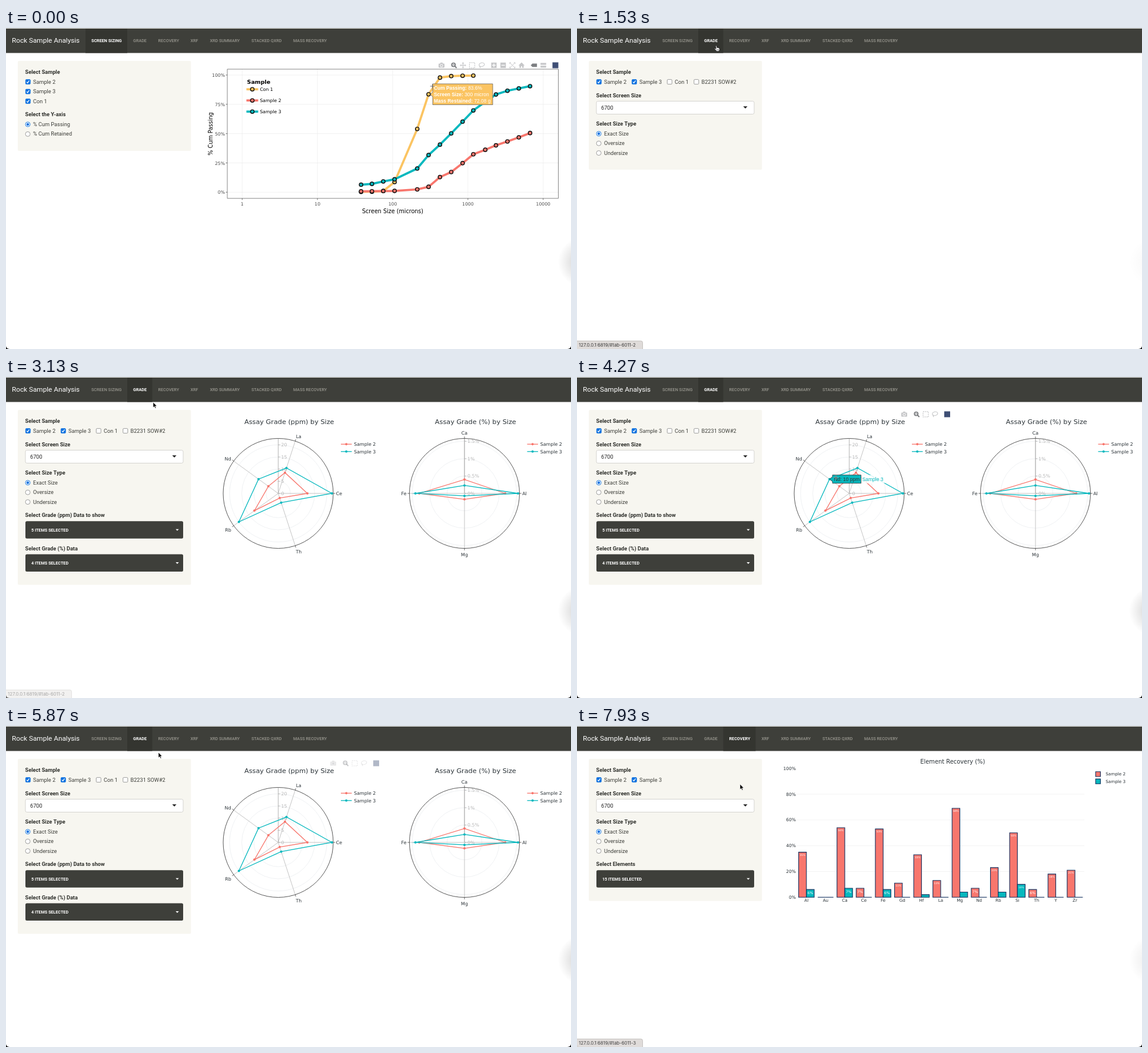
These frames come from a looping animation (960x546 px, 8000 ms). An HTML page with a canvas:

```html
<!DOCTYPE html>
<html lang="en">
<head>
<meta charset="utf-8">
<title>Rock Sample Analysis</title>
<style>
html, body { margin: 0; width: 100%; height: 100%; overflow: hidden; background: #fff; }
canvas { display: block; width: 960px; height: 546px; }
</style>
</head>
<body>
<canvas id="stage"></canvas>
<script>
const W = 960, H = 546, LOOP = 8000;
const canvas = document.getElementById('stage');
const dpr = window.devicePixelRatio || 1;
canvas.width = W * dpr;
canvas.height = H * dpr;
const c = canvas.getContext('2d');

const UI = 'Roboto, sans-serif', PLOT = '"DejaVu Sans", sans-serif', HOVER = '"Liberation Sans", Arial, sans-serif';
const DARK = '#3e3f3a', RED = '#f8766d', TEAL = '#06b8be', GOLD = '#fbc462', NAVY = '#12305f';

// drawing helpers
function text(s, x, y, size, color, font = UI, align = 'left', weight = 400) {
  c.font = `${weight} ${size}px ${font}`;
  c.textAlign = align;
  c.fillStyle = color;
  c.fillText(s, x, y + size * 0.36);
}
const plotText = (s, x, y, size = 7.7, align = 'center', color = '#2b3338', weight = 400) =>
  text(s, x, y, size, color, PLOT, align, weight);

function box(x, y, w, h, fill, stroke, radius = 0, lw = 0.7) {
  c.beginPath();
  c.roundRect(x, y, w, h, radius);
  paint(fill, stroke, lw);
}
function paint(fill, stroke, lw = 1) {
  if (fill) { c.fillStyle = fill; c.fill(); }
  if (stroke) { c.strokeStyle = stroke; c.lineWidth = lw; c.stroke(); }
}
function poly(pts, fill, stroke, lw, close = true) {
  c.beginPath();
  pts.forEach(([x, y]) => c.lineTo(x, y));
  if (close) c.closePath();
  paint(fill, stroke, lw);
}
const line = (x1, y1, x2, y2, color, lw = 0.7) => poly([[x1, y1], [x2, y2]], null, color, lw, false);
function dot(x, y, r, fill, stroke, lw) {
  c.beginPath();
  c.arc(x, y, r, 0, 7);
  paint(fill, stroke, lw);
}
function withAlpha(a, draw) {
  if (a <= 0) return;
  c.save();
  c.globalAlpha = Math.min(a, 1);
  draw();
  c.restore();
}
const ramp = (t, a, b) => Math.max(0, Math.min(1, (t - a) / (b - a)));
const pulse = (t, in0, in1, out0, out1) => ramp(t, in0, in1) * (1 - ramp(t, out0, out1));

// pointer
const PATH = [
  [0, 724.5, 99], [70, 724.5, 99], [470, 610, 150], [670, 610, 150], [1270, 236.5, 30],
  [1800, 236.5, 30], [2600, 249, 41], [2670, 249, 41], [2800, 250, 43], [3130, 250, 43],
  [3800, 430, 172], [4070, 430, 172], [4270, 440, 171], [4470, 482, 156], [4930, 482, 156],
  [5130, 476, 166], [5330, 476, 166], [5800, 259, 45], [5900, 259, 45], [6130, 271, 18],
  [7070, 271, 18], [7730, 277, 99], [8000, 277, 99]
];
function pointer(t) {
  const i = PATH.findIndex(p => p[0] > t);
  const [t0, x0, y0] = PATH[i - 1], [t1, x1, y1] = PATH[i];
  const k = (t - t0) / (t1 - t0), e = k * k * (3 - 2 * k);
  return [x0 + (x1 - x0) * e, y0 + (y1 - y0) * e];
}
function drawPointer(x, y, page) {
  const onPlot = page === 0 ? x > 376 && y > 70 : page === 1 && Math.hypot(x - 462.5, y - 198) < 93;
  c.save();
  c.translate(x, y);
  if (y < 42) {
    c.lineJoin = 'round';
    poly([[-0.9, 0.6], [0.1, 0], [1, 0.7], [1.4, 3.4], [2.6, 3.1], [3.2, 3.8], [4.4, 3.6], [4.9, 4.5],
      [5.9, 4.7], [5.7, 7.6], [4.6, 9.8], [0.6, 9.8], [-1, 7.4], [-2.9, 5.2], [-2.1, 4.4], [-0.3, 5.4]], '#fff', '#111', 0.8);
    for (const fx of [1.2, 2.6, 4]) line(fx, 6, fx, 8.3, '#111', 0.5);
  } else if (onPlot) {
    for (const [color, lw] of [['#fff8', 1.6], ['#333', 0.7]]) {
      line(-3.8, 0, 3.8, 0, color, lw);
      line(0, -3.8, 0, 3.8, color, lw);
    }
  } else {
    poly([[0, 0], [0, 9], [2.1, 7.1], [3.6, 10.3], [5, 9.7], [3.6, 6.6], [6.3, 6.4]], '#000', '#fff', 0.6);
  }
  c.restore();
}

// page frame
const TABS = [['SCREEN SIZING', 145], ['GRADE', 216], ['RECOVERY', 258.5], ['XRF', 313.5],
  ['XRD SUMMARY', 346.5], ['STACKED QXRD', 417], ['MASS RECOVERY', 488]];
function navbar(page, x, y) {
  box(0, 0, W, 1, '#e6e6e4');
  box(0, 1, W, 41.4, DARK);
  text('Rock Sample Analysis', 10, 20.5, 11.75, '#fff');
  TABS.forEach(([name, tx], i) => {
    const left = tx - 10, right = i < 6 ? TABS[i + 1][1] - 10 : 555;
    const hover = y < 42 && x >= left && x < right;
    if (i === page) box(left, 1, right - left, 41.4, '#343530');
    text(name, tx, 21.3, 7.2, i === page || hover ? '#fff' : '#98978f', UI, 'left', i === page ? 700 : 500);
  });
}
const label = (s, y) => text(s, 32.6, y, 9.17, '#2f302c', UI, 'left', 700);
const option = (s, x, y) => text(s, x + 13, y, 9.17, '#3e3f3a');
function check(s, x, y, on) {
  box(x + 0.3, y - 3.7, 8, 8, on ? '#0b70e0' : '#fff', on ? '#0b70e0' : '#777', 1.4);
  if (on) poly([[x + 2.2, y + 0.5], [x + 3.7, y + 2.2], [x + 6.5, y - 2]], null, '#fff', 1.3, false);
  option(s, x, y);
}
function radio(s, y, on) {
  dot(37, y + 0.4, 4, '#fff', on ? '#0b70e0' : '#777', on ? 0.9 : 0.7);
  if (on) dot(37, y + 0.4, 2.2, '#0b70e0');
  option(s, 33, y);
}
const caret = (x, y, w, h, color) => poly([[x - w, y - h], [x + w, y - h], [x, y + h]], color);
function picker(title, s, y) {
  label(title, y);
  box(33, y + 10.2, 268, 29.6, DARK, null, 2.5);
  text(s, 43, y + 25, 7.2, '#fff', UI, 'left', 700);
  caret(291, y + 25.2, 2.7, 1.4, '#fff');
}
function sidebar(page, stage) {
  const height = page === 0 ? 153 : stage === 0 ? 119 : stage === 1 ? 185 : page === 1 ? 297.5 : 241.5;
  box(20, 56, 294.3, height, '#f7f6f0', null, 2);
  label('Select Sample', 75);
  if (page === 0) {
    ['Sample 2', 'Sample 3', 'Con 1'].forEach((s, i) => check(s, 33, 91.3 + i * 16.5, true));
    label('Select the Y-axis', 147);
    radio('% Cum Passing', 163.5, true);
    radio('% Cum Retained', 180, false);
    return;
  }
  check('Sample 2', 33, 91.3, true);
  check('Sample 3', 93, 91.3, true);
  if (page === 1) {
    check('Con 1', 153, 91.3, false);
    check('B2231 SOW#2', 198.5, 91.3, false);
  }
  label('Select Screen Size', 114.3);
  box(33, 124.5, 268, 22, '#fff', '#c6c5c0', 2.5);
  text('6700', 41, 135.3, 9.17, '#222');
  caret(286, 135.2, 3.6, 1.9, '#222');
  if (stage < 1) return;
  label('Select Size Type', 162.7);
  ['Exact Size', 'Oversize', 'Undersize'].forEach((s, i) => radio(s, 179.4 + i * 16.4, i === 0));
  if (stage < 2) return;
  if (page === 1) {
    picker('Select Grade (ppm) Data to show', '5 ITEMS SELECTED', 235);
    picker('Select Grade (%) Data', '4 ITEMS SELECTED', 291.3);
  } else picker('Select Elements', '15 ITEMS SELECTED', 235);
}
function statusBar(url) {
  box(-3, 532.3, 114.5, 18, '#dfdbd9', '#b9b5b3', 3, 0.8);
  text(url, 3, 539.4, 7.8, '#3a3a3a', 'Inter, sans-serif');
}
function edges(glow) {
  const g = c.createRadialGradient(980, 398, 12, 980, 398, 42);
  g.addColorStop(0, `rgba(0,0,0,${glow})`);
  g.addColorStop(0.4, `rgba(0,0,0,${glow * 0.55})`);
  g.addColorStop(1, 'rgba(0,0,0,0)');
  c.fillStyle = g;
  c.fillRect(930, 350, 30, 96);
  for (const [x, d] of [[0, 1], [W, -1]]) {
    c.beginPath();
    c.moveTo(x, H - 5);
    c.quadraticCurveTo(x + d * 0.6, H - 0.6, x + d * 6, H);
    c.lineTo(x, H);
    paint('#111');
  }
}

// chart toolbar
const ICONS = {
  camera(x, y, k) { box(x - 5, y - 3, 10, 7, k, null, 1); box(x - 2, y - 4.5, 4, 2, k); dot(x, y + 0.5, 2.2, k, '#fff', 1); },
  zoom(x, y, k) { dot(x - 0.7, y - 0.8, 3, null, k, 1.9); line(x + 1.5, y + 1.4, x + 4.6, y + 4.6, k, 2); line(x - 2.2, y - 0.8, x + 0.8, y - 0.8, k, 1); },
  pan(x, y, k) {
    line(x - 4, y, x + 4, y, k, 1.1); line(x, y - 4, x, y + 4, k, 1.1);
    for (let i = 0; i < 4; i++) {
      const dx = [0, 1, 0, -1][i], dy = [-1, 0, 1, 0][i];
      poly([[x + dx * 5.3, y + dy * 5.3], [x + dx * 3 + dy * 2, y + dy * 3 + dx * 2], [x + dx * 3 - dy * 2, y + dy * 3 - dx * 2]], k);
    }
  },
  select(x, y, k) { c.setLineDash([2, 1.2]); box(x - 4.5, y - 4.5, 9, 9, null, k, 0, 1.2); c.setLineDash([]); },
  lasso(x, y, k) {
    c.beginPath(); c.ellipse(x + 0.3, y - 1, 4.6, 3.2, -0.2, 0, 7); paint(null, k, 1.1);
    line(x - 3, y + 1, x - 2.2, y + 4.6, k, 1.3);
  },
  plus(x, y, k) { box(x - 4.6, y - 4.6, 9.2, 9.2, k); line(x - 3, y, x + 3, y, '#fff', 1.4); line(x, y - 3, x, y + 3, '#fff', 1.4); },
  minus(x, y, k) { box(x - 4.6, y - 4.6, 9.2, 9.2, k); line(x - 3, y, x + 3, y, '#fff', 1.4); },
  auto(x, y, k) {
    for (const a of [-1, 1]) for (const b of [-1, 1]) {
      line(x, y, x + a * 3.6, y + b * 3.6, k, 1);
      poly([[x + a * 2.4, y + b * 4.6], [x + a * 4.6, y + b * 4.6], [x + a * 4.6, y + b * 2.4]], null, k, 1, false);
    }
  },
  home(x, y, k) { poly([[x - 5.2, y + 0.3], [x, y - 4.8], [x + 5.2, y + 0.3]], k); box(x - 3.6, y, 2.6, 4.4, k); box(x + 1, y, 2.6, 4.4, k); box(x - 3, y - 0.5, 6, 2, k); },
  tag(x, y, k) { poly([[x - 5.4, y], [x - 2.6, y - 2.8], [x + 5.2, y - 2.8], [x + 5.2, y + 2.8], [x - 2.6, y + 2.8]], k); },
  tags(x, y, k) { box(x - 4.8, y - 4, 9.6, 3.2, k); box(x - 4.8, y + 0.8, 9.6, 3.2, k); },
  mark(x, y) { box(x - 5, y - 5, 10, 10, '#3f4f75'); }
};
function toolbar(items) {
  items.forEach(([name, x, on]) => ICONS[name](x, 63.4, on ? '#7d7f82' : '#c6c7c9'));
}
const BAR_FULL = [['camera', 740], ['zoom', 761, 1], ['pan', 776.5], ['select', 792], ['lasso', 808], ['plus', 829],
  ['minus', 844.7], ['auto', 860.4], ['home', 876], ['tag', 897, 1], ['tags', 913], ['mark', 933.5]];
const BAR_SHORT = [['camera', 556], ['zoom', 577, 1], ['select', 592.5], ['lasso', 608], ['mark', 629]];

// screen sizing chart
const SIZES = [38, 53, 75, 106, 212, 300, 425, 600, 850, 1180, 1700, 2360, 3350, 4750, 6700];
const CURVES = [
  ['Con 1', GOLD, [0.3, 0.4, 1, 8.7, 54, 83.6, 97.8, 99.1, 99.4, 99.5]],
  ['Sample 2', RED, [0.7, 0.8, 1, 1.1, 2.4, 4.6, 12.9, 17.2, 24.8, 32.4, 36.2, 40, 43.3, 46.8, 50.5]],
  ['Sample 3', TEAL, [6.4, 7.1, 9.2, 11, 20.2, 31.7, 40.6, 50.2, 60.2, 69.8, 77.2, 83.4, 86.6, 88.6, 90.5]]
];
const sizeX = v => 401.3 + 127.85 * Math.log10(v);
const passY = p => 279.3 - p * 1.993;
function sizingChart(t) {
  for (let i = 0; i < 5; i++) {
    const x = sizeX(10 ** i), y = passY(i * 25);
    line(x, 70, x, 290, '#ebebeb');
    line(376, y, 938.5, y, '#ebebeb');
    line(x, 290, x, 292.4, '#333');
    line(373.6, y, 376, y, '#333');
    plotText(String(10 ** i), x, 298.8, 7.66, 'center', '#4d4d4d');
    plotText(i * 25 + '%', 372, y + 0.4, 7.66, 'right', '#4d4d4d');
  }
  box(376, 70, 562.5, 219.8, null, '#555', 0, 0.7);
  plotText('Screen Size (microns)', 657, 312, 9.6, 'center', '#000');
  c.save();
  c.translate(347.5, 180);
  c.rotate(-Math.PI / 2);
  plotText('% Cum Passing', 0, 0, 9.6, 'center', '#000');
  c.restore();
  plotText('Sample', 409.6, 91.3, 9.5, 'left', '#000', 700);
  c.lineJoin = 'round';
  CURVES.forEach(([name, color, vals], k) => {
    const pts = vals.map((v, i) => [sizeX(SIZES[i]), passY(v)]);
    poly(pts, null, color, 3.7, false);
    pts.forEach(([x, y]) => dot(x, y, 3.1, color, '#111', 1.4));
    const y = 104.2 + k * 19;
    line(408.5, y, 428.5, y, color, 3.7);
    dot(418.5, y, 3.1, color, '#111', 1.4);
    plotText(name, 431.5, y, 7.66, 'left', '#000');
  });
  c.lineJoin = 'miter';
  withAlpha(1 - ramp(t, 800, 1150), () => toolbar(BAR_FULL));
  if (t < 200) {
    poly([[721, 113], [725, 109], [725, 95], [827, 95], [827, 130.5], [725, 130.5], [725, 117]], GOLD, '#555', 0.7);
    [['Cum Passing:', ' 83.6%'], ['Screen Size:', ' 300 micron'], ['Mass Restained:', ' 72.08 g']].forEach(([a, b], i) => {
      const y = 101.8 + i * 11;
      text(a, 727, y, 8.4, '#fff', HOVER, 'left', 700);
      const w = c.measureText(a).width;
      text(b, 727 + w, y, 8.4, '#fff', HOVER);
    });
  }
}

// grade radar charts
const PPM = {
  x: 462.5, title: 'Assay Grade (ppm) by Size', unit: 4.13, ticks: [0, 5, 10, 15, 20], suffix: '', legend: 569,
  axes: [['Ce', 566, 198], ['La', 497.3, 101], ['Nd', 377, 139], ['Rb', 377.5, 260], ['Th', 497.3, 297]],
  data: [[12, 9, 5, 12.1, 2], [22.1, 11, 10, 20, 4]]
};
const PCT = {
  x: 779, title: 'Assay Grade (%) by Size', unit: 59.1, ticks: [0, 0.5, 1, 1.5], suffix: '%', legend: 885.5,
  axes: [['Al', 881, 198], ['Ca', 779, 95.5], ['Fe', 676, 198], ['Mg', 779, 302]],
  data: [[1.17, 0.4, 1.3, 0.17], [1.54, 0.23, 1.41, 0.07]]
};
const CY = 198, RIM = 93.5;
function spoke(r, chart, i, n) {
  const a = i / n * Math.PI * 2;
  return [chart.x + r * Math.cos(a), CY - r * Math.sin(a)];
}
function radar(chart) {
  const { x, unit, axes, ticks } = chart, n = axes.length;
  ticks.forEach(v => v && dot(x, CY, v * unit, null, '#e9ebee', 0.7));
  axes.forEach((_, i) => line(x, CY, ...spoke(RIM, chart, i, n), '#b5b5b5', 0.8));
  line(x, CY, x, CY - RIM, '#a5a5a5', 0.8);
  dot(x, CY, RIM, null, '#444', 0.9);
  axes.forEach(([name, lx, ly], i) => {
    line(...spoke(RIM, chart, i, n), ...spoke(RIM + 3.3, chart, i, n), '#444', 0.8);
    plotText(name, lx, ly, 7.86);
  });
  ticks.forEach(v => {
    line(x, CY - v * unit, x + 3.3, CY - v * unit, '#a5a5a5');
    plotText(v + chart.suffix, x + 5, CY - v * unit, 7.86, 'left', '#b9b9b9');
  });
  chart.data.forEach((vals, k) => {
    const color = [RED, TEAL][k], pts = vals.map((v, i) => spoke(v * unit, chart, i, n));
    poly(pts, null, color, 1.3);
    pts.forEach(p => dot(...p, 2, color));
    const y = 114.3 + k * 12.5;
    line(chart.legend, y, chart.legend + 18.5, y, color, 1.3);
    dot(chart.legend + 9.2, y, 2, color);
    plotText('Sample ' + (k + 2), chart.legend + 22.3, y, 7.86, 'left');
  });
  plotText(chart.title, x + 18.8, 76.3, 11.25);
}
function radarTip(k, i) {
  const v = PPM.data[k][i], color = [RED, TEAL][k];
  const [x, y] = spoke(v * PPM.unit, PPM, i, 5);
  const s = `${PPM.axes[i][0]}: ${v} ppm`;
  c.font = `8.5px ${HOVER}`;
  const w = c.measureText(s).width + 4.6, l = x + 5;
  box(l + w, y - 7, 40, 14, 'rgba(255,255,255,.85)');
  poly([[x, y], [l, y - 4], [l, y - 7], [l + w, y - 7], [l + w, y + 7], [l, y + 7], [l, y + 4]], color, '#333', 0.8);
  text(s, l + 2.3, y, 8.5, '#333', HOVER);
  text('Sample ' + (k + 2), l + w + 2, y, 8.5, color, HOVER);
}
function gradeCharts(t) {
  radar(PPM);
  radar(PCT);
  withAlpha(pulse(t, 3400, 3600, 5740, 5960), () => toolbar(BAR_SHORT));
  if (t >= 3730 && t < 4340) radarTip(1, 2);
  else if (t >= 4340 && t < 5000) radarTip(1, 1);
  else if (t >= 5000 && t < 5390) radarTip(0, 1);
}

// recovery chart
const ELEMENTS = 'Al Au Ca Ce Fe Gd Hf La Mg Nd Rb Si Th Y Zr'.split(' ');
const RECOVERY = [
  [35, 0, 54, 7, 53, 11, 33, 13, 69, 7, 23, 50, 6, 18, 21],
  [6, 0, 7, 0, 6, 0, 2, 0, 4, 0, 4, 10, 0, 0, 0]
];
function recoveryChart() {
  plotText('Element Recovery (%)', 638.3, 60.5, 9.9);
  for (let v = 0; v <= 100; v += 20) {
    const y = 291.3 - v * 2.192;
    if (v < 100) line(373.5, y, 862, y, '#f0f0f0');
    plotText(v + '%', 372, y, 7.5, 'right');
  }
  RECOVERY.forEach((vals, k) => {
    const color = [RED, TEAL][k];
    vals.forEach((v, i) => {
      const mid = 389.8 + i * 32.59, x = mid - 13.2 * (1 - k), h = v * 2.192;
      box(x, 291.3 - h, 13.2, h, v ? color : null, NAVY, 0, v ? 1.1 : 0.7);
      if (v > 4) plotText(v + '%', x + 6.6, 291.3 - h + (v < 10 ? 5.8 : 4.6), v < 10 ? 5.9 : 4.3, 'center', '#fff');
      if (!k) plotText(ELEMENTS[i], mid, 296.7, 7.2);
    });
    const y = 81.8 + k * 12.3;
    box(881.2, y - 4, 8.2, 8.2, color, NAVY, 0, 1.1);
    plotText('Sample ' + (k + 2), 898.3, y, 7.2, 'left');
  });
}

function draw(t) {
  const page = t < 1470 ? 0 : t < 6270 ? 1 : 2;
  const since = t - [0, 1470, 6270][page];
  const stage = since < 60 ? 0 : since < 130 ? 1 : 2;
  const ready = page === 0 || since >= 330;
  const [x, y] = pointer(t);
  c.setTransform(dpr, 0, 0, dpr, 0, 0);
  c.fillStyle = '#fff';
  c.fillRect(0, 0, W, H);
  navbar(page, x, y);
  sidebar(page, stage);
  if (ready) [sizingChart, gradeCharts, recoveryChart][page](t);
  edges(!ready ? 0.03 : page === 2 ? 0.07 : 0.16);
  withAlpha(pulse(t, 1390, 1520, 2980, 3230), () => statusBar('127.0.0.1:6819/#tab-6011-2'));
  withAlpha(pulse(t, 6200, 6320, 7920, 8200), () => statusBar('127.0.0.1:6819/#tab-6011-3'));
  drawPointer(x, y, page);
}

const start = performance.now();
function tick() {
  draw((performance.now() - start) % LOOP);
  requestAnimationFrame(tick);
}
tick();
</script>
</body>
</html>
```
